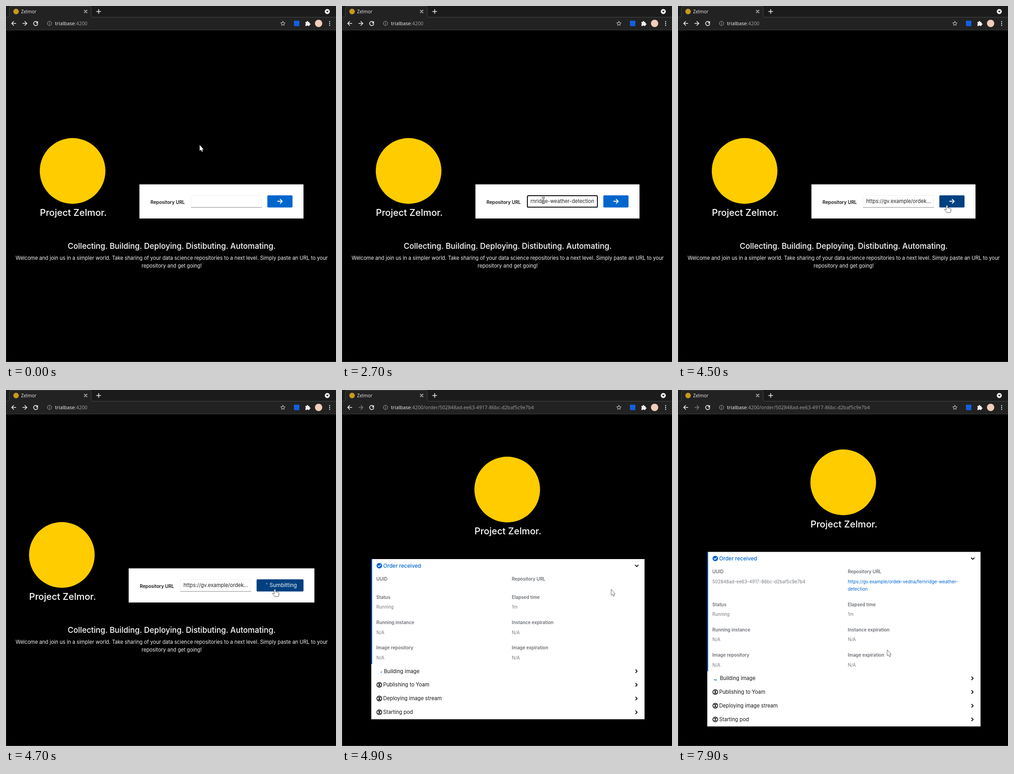
An HTML page for the animation above (8000 ms loop, 721x777 px).

```html
<!DOCTYPE html>
<html lang="en">
<head>
<meta charset="utf-8">
<title>Zelmor</title>
<style>
  html, body { margin: 0; width: 100%; height: 100%; overflow: hidden; background: #000; }
  svg { display: block; width: 721px; height: 777px; }
  text { font-family: Inter, "Open Sans", sans-serif; font-optical-sizing: none; white-space: pre; }
  .ui { font-family: "Noto Sans", "Open Sans", sans-serif; }
  .line { fill: none; stroke-linecap: round; stroke-linejoin: round; }
</style>
</head>
<body>
<svg id="stage" viewBox="0 0 721 777"></svg>
<script>
const LOOP = 8000, STEP = 100;
const SUBMIT = 4600, ORDER = 4800, DETAILS = 5000;
const BLUE = '#0066cc', GREY = '#6a6e73', INK = '#151515', GOLD = '#ffcc00';
const HOST = 'trialbase:4200';
const ORDER_ID = '502848ad-ee63-4917-86bc-d2baf5c9e7b4';
const REPO = 'https://gv.example/ordek-vedna/fernridge-weather-';

const text = (x, y, size, fill, str, extra = '') =>
  `<text x="${x}" y="${y}" font-size="${size}" fill="${fill}" ${extra}>${str}</text>`;
const rect = (x, y, w, h, fill, extra = '') =>
  `<rect x="${x}" y="${y}" width="${w}" height="${h}" fill="${fill}" ${extra}/>`;
const circle = (x, y, r, fill, extra = '') =>
  `<circle cx="${x}" cy="${y}" r="${r}" fill="${fill}" ${extra}/>`;
const line = (d, stroke, width, extra = '') =>
  `<path class="line" d="${d}" stroke="${stroke}" stroke-width="${width}" ${extra}/>`;
const group = (id, body) => `<g id="${id}">${body}</g>`;
const MID = 'text-anchor="middle"', MEDIUM = 'font-weight="500"', SEMI = 'font-weight="600"', UI = 'class="ui"';

function browserBar() {
  const star = Array.from({ length: 10 }, (_, i) => {
    const a = i * Math.PI / 5 - Math.PI / 2, r = i % 2 ? 2.3 : 5;
    return `${(605 + r * Math.cos(a)).toFixed(1)} ${(38.3 + r * Math.sin(a)).toFixed(1)}`;
  }).join('L');
  return rect(0, 0, 721, 25, '#1b1b1b') + rect(0, 24, 721, 29, '#222') +
    '<path d="M2 25Q8 25 8 19V5Q8 0 13 0H181Q186 0 186 5V19Q186 25 192 25Z" fill="#222"/>' +
    line('M0 24.5H3Q7.5 24 7.5 19V5Q8 .5 13 .5H181Q186 .5 186 5V19Q186 24.5 191 24.5H721', '#474747', 1) +
    rect(0, 52, 721, 1, '#3c3c3c') +
    circle(22, 12, 6, '#c9991f') +
    text(33, 16, 10, '#ddd', 'Zelmor', UI) +
    line('M171 9l6 6m0-6l-6 6', '#ddd', 1.4) +
    line('M198 12h9m-4.5-4.5v9', '#eee', 1.6) +
    circle(702, 12, 5.5, '#f4f4f4') + '<path d="M699 10.5h6l-3 3.7z" fill="#222"/>' +
    line('M21.5 38H12.5m4.2-4.3L12.4 38l4.3 4.3', '#eee', 1.6) +
    line('M36.5 38h9m-4.2-4.3L45.6 38l-4.3 4.3', '#eee', 1.6, 'id="forward"') +
    line('M68.6 35.4A4.6 4.6 0 1 0 69.4 39.3', '#eee', 1.6) + '<path d="M70 33v5h-5z" fill="#eee"/>' +
    circle(95, 38, 4.7, 'none', 'stroke="#aaa"') + line('M95 37.6v2.6M95 35.6v.1', '#aaa', 1.1) +
    text(107, 42, 10.67, '#9a9a9a', `<tspan fill="#e8e8e8">${HOST.slice(0, 9)}</tspan>${HOST.slice(9)}<tspan id="path"></tspan>`, UI) +
    line(`M${star}Z`, '#ddd', 1) +
    rect(629, 32, 12, 12, '#175ddc') +
    '<path d="M654 35h3a1.7 1.7 0 1 1 3.2 0h2.8v3a1.7 1.7 0 1 1 0 3.2v2.3h-3.1a1.6 1.6 0 0 0-3 0H654v-3a1.7 1.7 0 0 0 0-3.2z" fill="#eee"/>' +
    circle(683, 38, 8, '#f3cdbb') +
    [34, 38, 42].map(y => circle(707, y, 1.2, '#eee')).join('') +
    rect(0, 53, 1, 724, '#2a2a2a') + rect(0, 776, 721, 1, '#2a2a2a');
}

const brand = (x, y) =>
  circle(x, y, 71.7, GOLD) + text(x + 1.5, y + 98, 20.2, '#fff', 'Project Zelmor.', `${MID} ${MEDIUM}`);

function homePage() {
  return '<rect id="card" y="389.3" height="74.5" fill="#fff"/>' +
    group('form',
      brand(145.5, 360) +
      text(315.7, 432, 10.1, INK, 'Repository URL', SEMI) +
      rect(404.5, 413.5, 154, 26, '#fff', 'stroke="#f0f0f0"') +
      rect(404, 439, 155, 1, '#8a8d90', 'id="underline"') +
      rect(405, 414, 153, 25, '#fff', 'id="ring" rx="2.5" stroke="#101010" stroke-width="2"') +
      `<g clip-path="url(#field)">${text(551, 430, 11.1, '#222', REPO + 'detection', 'id="pasted" text-anchor="end"')}</g>` +
      text(411.3, 430, 11.1, '#222', REPO.slice(0, 24) + '...', 'id="short"') +
      rect(411, 419, 1, 14, '#000', 'id="caret"')) +
    '<rect id="button" y="413.2" height="26.6" rx="2"/>' +
    line('M593.6 426.3h9.6m-4-4.3l4.3 4.3-4.3 4.3', '#fff', 1.9, 'id="arrow"') +
    group('sending', text(575.8, 430, 11.8, '#f4f4f4', 'Sumbitting') + line('', '#fff', 1.5, 'id="spinA"')) +
    text(362, 529.5, 17.05, '#fff', 'Collecting. Building. Deploying. Distibuting. Automating.', `${MID} ${MEDIUM}`) +
    text(362, 553.5, 11.08, '#f4f4f4', 'Welcome and join us in a simpler world. Take sharing of your data science repositories to a next level. Simply paste an URL to your', MID) +
    text(362, 571.2, 11.08, '#f4f4f4', 'repository and get going!', MID);
}

const label = (x, y, str) => text(x, y, 9.9, GREY, str, SEMI);
const value = (x, y, str, fill = '#777b80') => text(x, y, 9.8, fill, str);

function orderPage() {
  const fields = [
    [471.5, 'Status', 'Running', 'Elapsed time', '1m'],
    [526.7, 'Running instance', 'N/A', 'Instance expiration', 'N/A'],
    [582, 'Image repository', 'N/A', 'Image expiration', 'N/A'],
  ].map(([y, a, b, c, d]) =>
    label(75, y, a) + value(75, y + 21.7, b) + label(371, y, c) + value(371, y + 21.7, d)).join('');
  const rows = ['Building image', 'Publishing to Yoam', 'Deploying image stream', 'Starting pod'].map((name, i) => {
    const y = 629.3 + i * 29.9;
    const icon = i ? circle(81.5, y, 5.3, 'none', 'stroke="#000" stroke-width="1.5"') +
      line(`M79.3 ${y - 2.7}h4.4l-4.4 5.4h4.4z`, '#000', 1.1) : '';
    return icon + text(i ? 90 : 91.5, y + 4, 11.2, INK, name) +
      line(`M641.7 ${y - 3.2}l3.2 3.2-3.2 3.2`, '#111', 1.9);
  }).join('');
  return '<rect id="panel" x="64" width="597" fill="#fff"/><rect id="stripe" x="64" width="2" fill="#0066cc"/>' +
    group('upper',
      brand(361, 201.5) +
      circle(81.5, 367.7, 6, BLUE) + line('M78.8 367.9l2 2 3.6-3.8', '#fff', 1.5) +
      text(90, 371.9, 11.6, BLUE, 'Order received', MEDIUM) +
      line('M640.8 366.5l3.2 3.2 3.2-3.2', '#111', 1.9) +
      label(75, 400.4, 'UUID') + label(371, 400.4, 'Repository URL')) +
    group('details',
      value(75, 422, ORDER_ID) + value(371, 422, REPO, BLUE) + value(371, 437.7, 'detection', BLUE)) +
    group('lower', fields + rows + line('', BLUE, 1.4, 'id="spinB"'));
}

const pointers =
  '<path id="arrowCur" d="M0 0V13.2L3 11 4.8 15.2 7.2 14.2 5.6 10.2H9Z" fill="#fff" stroke="#444" stroke-width=".8"/>' +
  group('beamCur', line('M-2-6H2M0-6V6M-2 6H2', '#555', 3) + line('M-2-6H2M0-6V6M-2 6H2', '#eee', 1.2)) +
  '<path id="handCur" d="M-2 1.5Q-2 0-.5 0T1 1.5V6Q4 5.3 5 6.5 7.6 6.4 8.5 8V12Q8 14 7 16H-.5Q-3 13-6 9.5-6 7.6-4 8.4L-2 10Z" fill="#fff" stroke="#555"/>';

const stage = document.getElementById('stage');
stage.innerHTML = '<defs><clipPath id="field"><rect x="411" y="414" width="142" height="25"/></clipPath></defs>' +
  rect(0, 0, 721, 777, '#000') + group('home', homePage()) + group('order', orderPage()) +
  browserBar() + pointers;

const el = {};
stage.querySelectorAll('[id]').forEach(n => el[n.id] = n);
const set = (id, attrs) => { for (const k in attrs) el[id].setAttribute(k, attrs[k]); };
const show = (id, on) => set(id, { display: on ? 'inline' : 'none' });
const shift = (id, x, y) => set(id, { transform: `translate(${x} ${y})` });

const ease = k => k < .5 ? 4 * k ** 3 : 1 - 4 * (1 - k) ** 3;
const progress = (t, from, to) => ease(Math.min(1, Math.max(0, (t - from) / (to - from))));

// Turning arc that grows during 40% of its period, then shrinks again.
function arc(cx, cy, r, t) {
  const p = ((t / 1400) % 1 + 1) % 1;
  const size = (6 + 64 * (p < .4 ? p / .4 : (1 - p) / .6)) / 283 * 2 * Math.PI;
  const start = (.73 * t - 35) * Math.PI / 180;
  const at = a => `${cx + r * Math.cos(a)} ${cy + r * Math.sin(a)}`;
  return `M${at(start)}A${r} ${r} 0 0 1 ${at(start + size)}`;
}

function pointerAt(t) {
  const stops = [[600, 1100, 427, 303], [3600, 4300, 440, 424], [7100, 7900, 588, 435]];
  const ends = [[440, 424], [588, 435], [457, 567]];
  if (t < 500) return [423, 303];
  const i = t < 3700 ? 0 : t < 7200 ? 1 : 2;
  const [from, to, x, y] = stops[i], k = progress(t, from, to);
  return [x + (ends[i][0] - x) * k, y + (ends[i][1] - y) * k];
}

function draw(t) {
  const onOrder = t >= ORDER, sent = t >= SUBMIT;
  const [x, y] = pointerAt(t);
  const inField = !sent && x > 404 && x < 559 && y > 413;
  const onButton = !onOrder && x > 571 && y > 413;
  const focused = t >= 1300 && t < 4500;
  const pasted = t >= 2100;

  show('home', !onOrder);
  show('order', onOrder);
  el.path.textContent = onOrder ? '/order/' + ORDER_ID : '';
  set('forward', { stroke: onOrder ? '#777' : '#eee' });

  const dx = sent ? -23.5 : 0;
  set('card', { x: 291.5 + dx, width: sent ? 405.8 : 358.5 });
  shift('form', dx, 0);
  set('underline', { fill: inField ? BLUE : '#8a8d90' });
  show('ring', focused);
  show('pasted', pasted && focused);
  show('short', t >= 4500);
  const blinkOff = pasted && Math.floor((t - 2100) / 600) % 2;
  show('caret', focused && t >= 1400 && !blinkOff);
  set('caret', { x: pasted ? 551 : 411 });
  set('button', { x: 571 + dx, width: sent ? 102.5 : 55, fill: onButton ? '#004080' : BLUE });
  show('arrow', !sent);
  show('sending', sent);
  set('spinA', { d: arc(564.5, 426, 6.3, t - 4700) });

  const gap = t < DETAILS ? 15.7 : 0;
  set('panel', { y: 353.3 + gap, height: 381 - 2 * gap });
  set('stripe', { y: 353.3 + gap, height: 260.5 - 2 * gap });
  shift('upper', 0, gap);
  shift('lower', 0, -gap);
  show('details', !gap);
  set('spinB', { d: arc(82, 627, 6, t - ORDER) });

  const kind = inField ? 'beamCur' : onButton ? 'handCur' : 'arrowCur';
  for (const id of ['beamCur', 'handCur', 'arrowCur']) show(id, id === kind);
  shift(kind, x, y);
}

function tick() {
  draw(Math.floor(performance.now() % LOOP / STEP) * STEP);
  requestAnimationFrame(tick);
}
tick();
</script>
</body>
</html>
```
